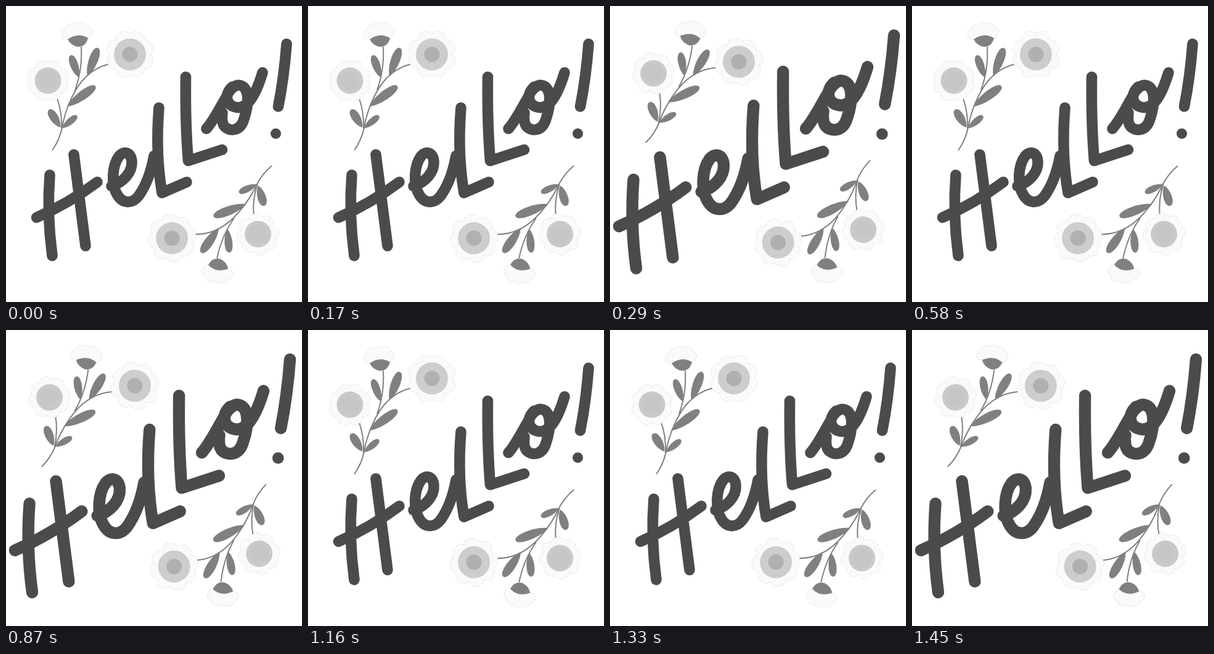
Write an HTML page with a canvas that moves like this. It is 480 by 480 pixels and loops after 1740 ms.

```html
<!DOCTYPE html>
<html lang="en">
<head>
<meta charset="utf-8">
<title>Hello!</title>
<style>
html, body { margin: 0; width: 100%; height: 100%; overflow: hidden; background: #fff; }
canvas { display: block; width: 480px; height: 480px; }
</style>
</head>
<body>
<canvas id="stage" width="480" height="480"></canvas>
<script>
const ctx = document.getElementById('stage').getContext('2d');
const STEP = 290, INK = '#4b4b4b', LEAF = '#808080', PETAL = '#fafafa', EDGE = '#cecece';

const lettering = new Path2D(`
  M71 274 Q66 338 75 405 M110 241 L129 389 M49.5 343 Q102 320 148 285.5
  M171 292 C190 286 205 270 204 252 C203 237 191 234 183 244
  C172 259 170 290 181 307 C190 321 205 321 215 308 C228 290 236 265 240 243
  M248 165 Q242 240 253 303 L293 285.5
  M291.5 115 Q290.5 190 295.5 251 L350.5 233
  M325 199 C336 187 345 168 357 148 C363 133 374 126 381 129
  C395 134 394 160 386 183 C380 204 362 204 354 195 Q349 188 351 173
  M416 108 C405 145 390 169 372 164 C356 160 354 143 367 131
  M455 61.5 Q451 115 441.5 163`);
const stems = new Path2D(`
  M75 234 Q87 217 91 197 C95 172 108 140 123 122 Q143 98 173 93
  M122 66 Q124 104 112 136 M83 150 Q91 172 90 199`);
const budCup = new Path2D('M100 54 Q117 42 133 52 Q129 67 116 66 Q105 64 100 54Z');

// base x, base y, tip x, tip y, width
const leaves = [
  [118, 116, 105, 80, 13], [132, 114, 149, 68, 15], [99, 163, 145, 130, 15],
  [88, 197, 70, 168, 14], [91, 198, 115, 178, 11]
];
const budPetals = [[98, 46, 8], [104, 38, 8], [114, 35, 8], [125, 35, 8], [132, 42, 8], [128, 48, 8], [114, 47, 11]];

function disc(x, y, r, color) {
  ctx.beginPath();
  ctx.arc(x, y, r, 0, Math.PI * 2);
  ctx.fillStyle = color;
  ctx.fill();
}

// Speckled outline around the union of several circles
function petals(circles) {
  ctx.save();
  ctx.strokeStyle = EDGE;
  ctx.lineWidth = 1.4;
  ctx.setLineDash([2, 2]);
  for (const [x, y, r] of circles) {
    ctx.beginPath();
    ctx.arc(x, y, r, 0, Math.PI * 2);
    ctx.stroke();
  }
  ctx.restore();
  for (const c of circles) disc(...c, PETAL);
}

function flower(x, y, r, rings) {
  const lobes = Array.from({ length: 8 }, (_, i) => {
    const a = (i + 0.5) * Math.PI / 4;
    return [x + Math.cos(a) * r * 0.66, y + Math.sin(a) * r * 0.66, r * 0.34];
  });
  petals([...lobes, [x, y, r * 0.72]]);
  for (const [size, color] of rings) disc(x, y, size, color);
}

function leaf(x, y, tipX, tipY, w) {
  const len = Math.hypot(tipX - x, tipY - y), h = w * 0.66;
  ctx.save();
  ctx.translate(x, y);
  ctx.rotate(Math.atan2(tipY - y, tipX - x));
  ctx.beginPath();
  ctx.moveTo(0, 0);
  ctx.bezierCurveTo(len * 0.3, -h, len, -h, len, 0);
  ctx.bezierCurveTo(len, h, len * 0.3, h, 0, 0);
  ctx.fillStyle = LEAF;
  ctx.fill();
  ctx.restore();
}

// Sprig placed by the centre of its large flower
function sprig(x, y, degrees) {
  ctx.save();
  ctx.translate(x, y);
  ctx.rotate(degrees * Math.PI / 180);
  ctx.translate(-201, -78);
  ctx.strokeStyle = LEAF;
  ctx.lineWidth = 2;
  ctx.stroke(stems);
  for (const l of leaves) leaf(...l);
  petals(budPetals);
  ctx.fillStyle = LEAF;
  ctx.fill(budCup);
  flower(201, 78.5, 39, [[26, '#cdcdcd'], [12.5, '#b0b0b0']]);
  flower(68, 121, 34, [[21.5, '#c9c9c9'], [15, '#c6c6c6'], [1, '#b8b8b8']]);
  ctx.restore();
}

function hello(x, y, scale) {
  ctx.save();
  ctx.translate(x, y);
  ctx.scale(scale, scale);
  ctx.strokeStyle = INK;
  ctx.lineWidth = 17.6;
  ctx.lineCap = ctx.lineJoin = 'round';
  ctx.stroke(lettering);
  disc(437.5, 207, 8.5, INK);
  ctx.restore();
}

const poses = [
  { text: [0, 0, 1], sprigs: [[201, 78, 0], [269, 377, 195]] },
  { text: [-40, -20, 1.1], sprigs: [[209, 90, 10], [272.5, 384, 189.2]] }
];

function draw() {
  const pose = poses[Math.floor(performance.now() / STEP) % 2];
  ctx.fillStyle = '#fff';
  ctx.fillRect(0, 0, 480, 480);
  for (const s of pose.sprigs) sprig(...s);
  hello(...pose.text);
  requestAnimationFrame(draw);
}
draw();
</script>
</body>
</html>
```
